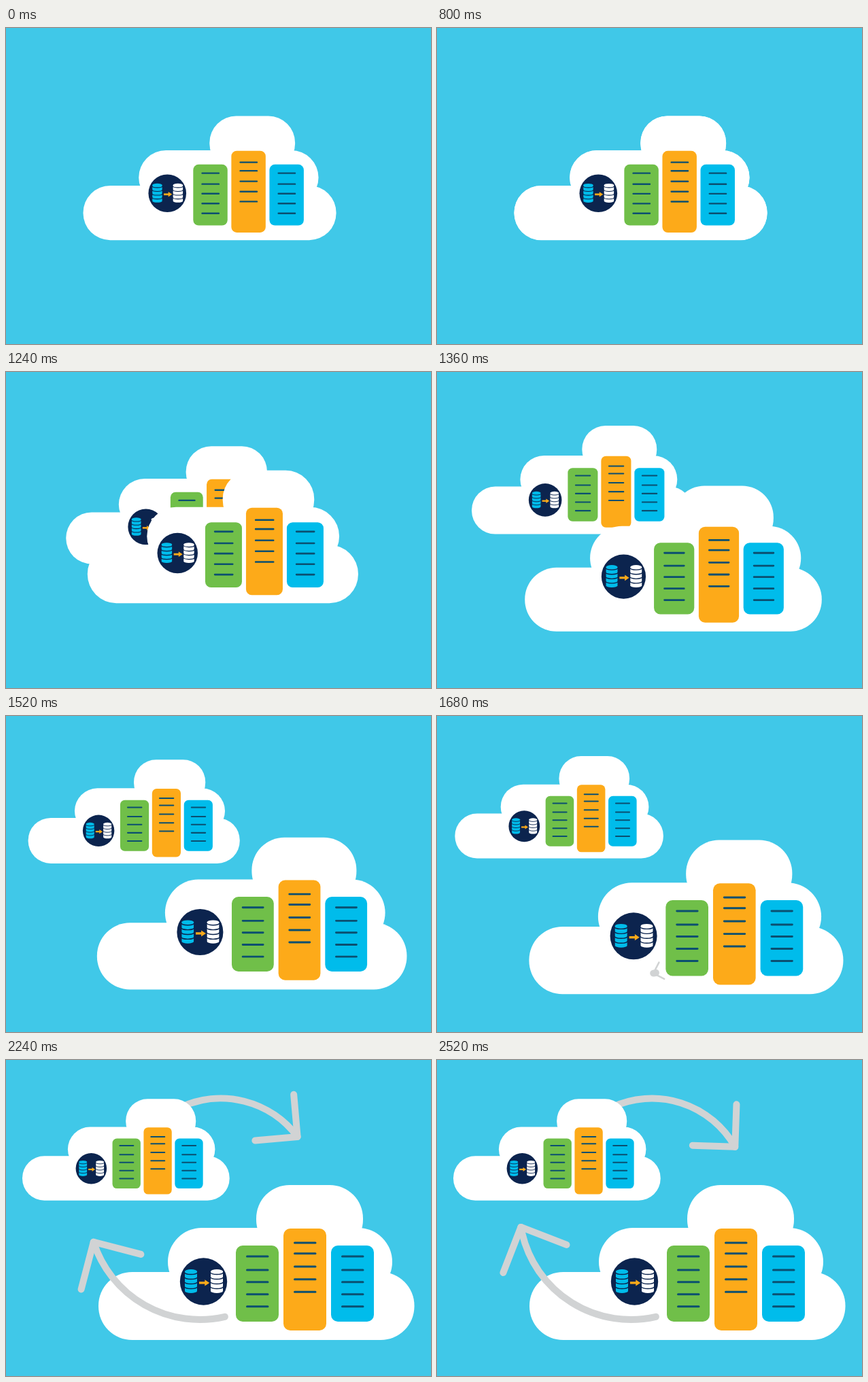
An HTML page with a canvas for the animation above (3.4 s loop, 625x465 px).

```html
<!DOCTYPE html>
<html lang="en">
<head>
<meta charset="utf-8">
<title>Cloud replication</title>
<style>
  html, body { margin: 0; width: 100%; height: 100%; overflow: hidden; background: #40c8e8; }
  canvas { display: block; width: 625px; height: 465px; }
</style>
</head>
<body>
<canvas id="stage" width="625" height="465"></canvas>
<script>
const ctx = document.getElementById('stage').getContext('2d');
const LOOP = 3400, STEP = 40;
const SKY = '#40c8e8', NAVY = '#0c244e', CYAN = '#00bceb', GREEN = '#70bf49',
      ORANGE = '#fdaa19', INK = '#0b4f70', GREY = '#d1d3d4';

// Cloud placements: left, top and scale.
const START = [113.5, 129.5, 0.801];
const FRONT = [136, 184, 1];
const BACK = [24, 57.2, 0.656];

const TALL_LINES = [85, 100.7, 120, 138.8, 157.2];
const SHORT_LINES = [105, 125, 142.7, 160.8, 178.8];

const RAD = Math.PI / 180;
const clamp = v => Math.min(1, Math.max(0, v));
const mix = (a, b, p) => a + (b - a) * p;
const span = (t, from, to) => clamp((t - from) / (to - from));

// Ease with horizontal end tangents and handles at x1 and x2.
function ease(u, x1, x2) {
  if (u <= 0 || u >= 1) return clamp(u);
  let lo = 0, hi = 1;
  for (let i = 0; i < 24; i++) {
    const s = (lo + hi) / 2, r = 1 - s;
    const x = 3 * s * r * r * x1 + 3 * s * s * r * x2 + s * s * s;
    if (x < u) lo = s; else hi = s;
  }
  return lo * lo * (3 - 2 * lo);
}

function box(x, y, w, h, r, color) {
  ctx.fillStyle = color;
  ctx.beginPath();
  ctx.roundRect(x, y, w, h, r);
  ctx.fill();
}

function server(x, y, h, color, lines) {
  box(x, y, 63, h, 10, color);
  ctx.strokeStyle = INK;
  ctx.lineWidth = 3;
  ctx.lineCap = 'round';
  ctx.beginPath();
  for (const ly of lines) {
    ctx.moveTo(x + 16.5, ly);
    ctx.lineTo(x + 47, ly);
  }
  ctx.stroke();
}

function database(x, y, color) {
  const w = 18, h = 35, rim = 3;
  ctx.fillStyle = color;
  ctx.beginPath();
  ctx.ellipse(x + w / 2, y + rim, w / 2, rim, 0, Math.PI, 0);
  ctx.lineTo(x + w, y + h - rim);
  ctx.ellipse(x + w / 2, y + h - rim, w / 2, rim, 0, 0, Math.PI);
  ctx.fill();
  ctx.strokeStyle = NAVY;
  ctx.lineWidth = 1.4;
  ctx.lineCap = 'butt';
  for (let i = 0; i < 4; i++) {
    ctx.beginPath();
    ctx.ellipse(x + w / 2, y + 4.5 + i * 7, w / 2 + 0.5, rim, 0, 0, Math.PI);
    ctx.stroke();
  }
}

function badge(dy) {
  ctx.save();
  ctx.translate(154.5, 142 + dy);
  ctx.fillStyle = NAVY;
  ctx.beginPath();
  ctx.arc(0, 0, 34.7, 0, 7);
  ctx.fill();
  database(-27.5, -18, CYAN);
  database(10.5, -18, '#fff');
  ctx.fillStyle = ORANGE;
  ctx.fillRect(-6.5, 0.2, 9, 3.4);
  ctx.beginPath();
  ctx.moveTo(1.8, -2.7);
  ctx.lineTo(8.7, 1.9);
  ctx.lineTo(1.8, 6.5);
  ctx.fill();
  ctx.restore();
}

function cloud(place, p, badgeDrop) {
  const [x, y, s] = START.map((v, i) => mix(v, place[i], p));
  ctx.save();
  ctx.translate(x, y);
  ctx.scale(s, s);
  box(232, 0, 157, 100, 49, '#fff');
  box(102, 63, 330, 100, 50, '#fff');
  box(0, 128, 464.5, 100, 49.5, '#fff');
  badge(badgeDrop);
  server(202, 89, 112, GREEN, SHORT_LINES);
  server(272, 64, 150, ORANGE, TALL_LINES);
  server(342, 89, 112, CYAN, SHORT_LINES);
  ctx.restore();
}

// Shaft grows along a circle; the head rides its end, tilted off the tangent.
function arrow(a, p, size) {
  const angle = mix(a.from, a.to, p);
  const tipX = a.x + a.r * Math.cos(angle * RAD);
  const tipY = a.y + a.r * Math.sin(angle * RAD);
  const back = angle - 90 + a.tilt(p);
  ctx.strokeStyle = GREY;
  ctx.lineCap = ctx.lineJoin = 'round';
  ctx.lineWidth = 10;
  ctx.beginPath();
  ctx.arc(a.x, a.y, a.r, a.from * RAD, angle * RAD);
  ctx.stroke();
  const arm = side => ctx.lineTo(
    tipX + a.arm * size * Math.cos((back + side) * RAD),
    tipY + a.arm * size * Math.sin((back + side) * RAD));
  ctx.lineWidth = 10 * size;
  ctx.beginPath();
  arm(-45);
  ctx.lineTo(tipX, tipY);
  arm(45);
  ctx.stroke();
}

const UPPER = { x: 316, y: 197, r: 140.5, from: -115, to: -29.5, arm: 62.5, tilt: p => -11 - 2.5 * p };
const LOWER = { x: 285, y: 218, r: 164, from: 77, to: 170.2, arm: 72, tilt: p => -6 - 8 * p * p };

function draw(t) {
  const apart = ease(span(t, 760, 1920), 0.75, 0.16);
  const grow = ease(span(t, 1600, 2520), 0.45, 0.294);
  const head = span(t, 1600, 1920);
  ctx.fillStyle = SKY;
  ctx.fillRect(0, 0, 625, 465);
  if (head > 0) arrow(UPPER, grow, head);
  if (t >= 800) cloud(BACK, apart, 14.3);
  cloud(FRONT, t >= 800 ? apart : 0, 0);
  if (head > 0) arrow(LOWER, grow, head);
}

const begin = performance.now();
function tick() {
  const t = (performance.now() - begin) % LOOP;
  draw(Math.floor(t / STEP) * STEP);
  requestAnimationFrame(tick);
}
tick();
</script>
</body>
</html>
```
